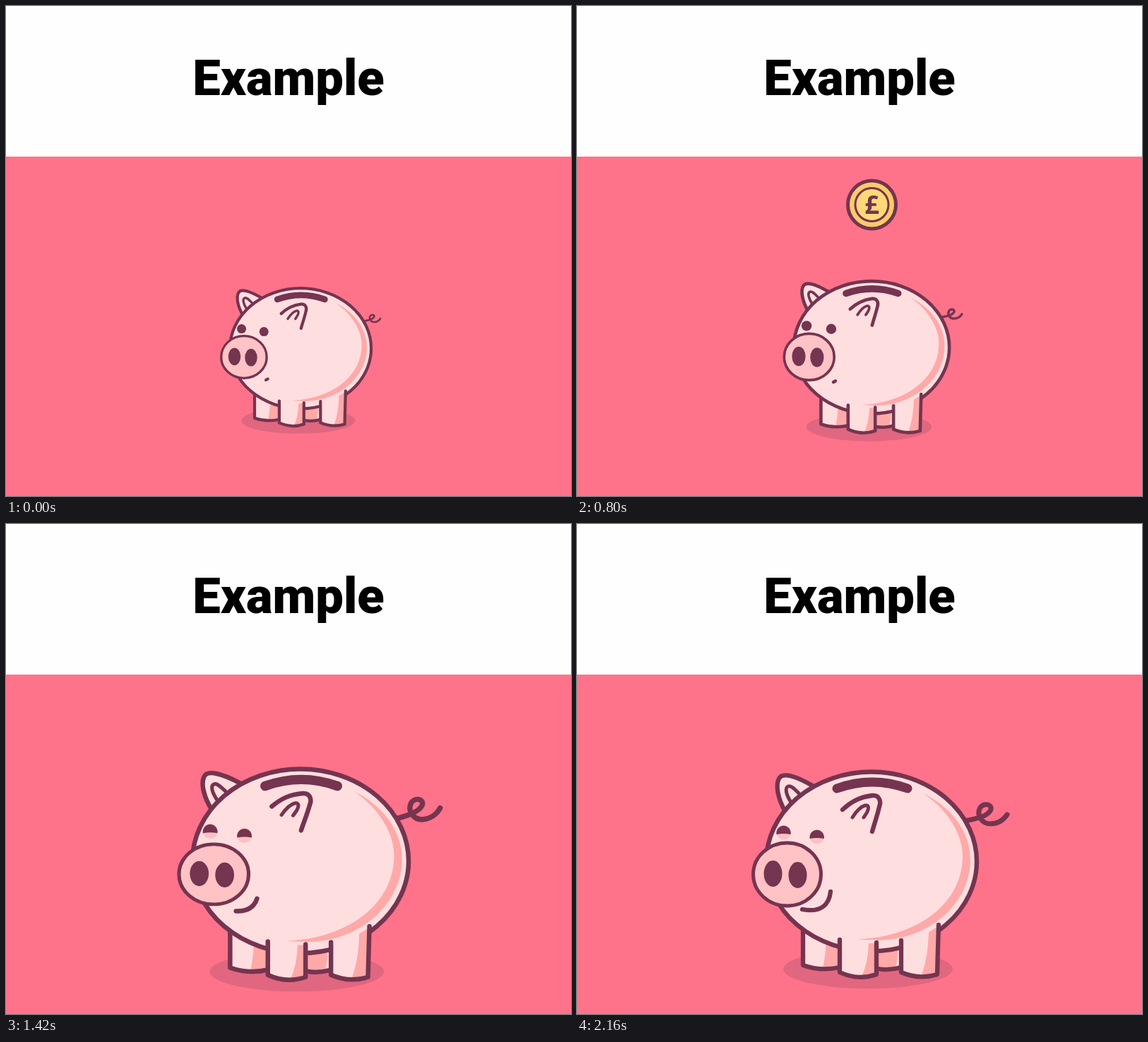
Animation of 800x693 px, one loop 2180 ms. Source, as an HTML page:

```html
<!DOCTYPE html>
<html lang="en">
<head>
<meta charset="utf-8">
<title>Piggy bank</title>
<style>
  html, body { margin: 0; width: 100%; height: 100%; overflow: hidden; background: #fefefe; }
  svg { display: block; width: 800px; height: 693px; }
  .line { stroke: #75344f; stroke-width: 6.3; stroke-linecap: round; stroke-linejoin: round; fill: none; }
  .thin { stroke-width: 5; }
  .skin { fill: #ffdee0; }
  .shade { fill: #ffa9a9; }
  .dark { fill: #75344f; }
  .lid { fill: #ffbfc5; }
</style>
</head>
<body>
<svg viewBox="0 0 800 693">
  <defs>
    <clipPath id="air"><rect id="airBox" y="213" width="800" height="480"/></clipPath>
    <g id="openEye"><circle class="dark" r="9.7"/></g>
    <g id="happyEye">
      <circle class="lid" r="10.3"/>
      <path class="dark" d="M-10 3A10.2 10.2 0 1 1 10 3Q0 1 -10 3Z"/>
    </g>
  </defs>
  <rect y="213" width="800" height="480" fill="#ff738a"/>

  <g id="pig">
    <ellipse cx="412" cy="629.5" rx="120" ry="27.5" fill="#e0677f"/>

    <!-- far legs -->
    <path class="skin" d="M320 560V624Q345 633 372 627V560Z"/>
    <path class="shade" d="M353 580Q353 606 348 629L372 627V580Z"/>
    <path class="line" d="M320 568V624Q345 633 372 627"/>
    <path class="skin" d="M425 595H460V628Q442 632 425 629Z"/>
    <path class="shade" d="M427 600H454Q455 618 450 629L427 629Z"/>
    <path class="line" d="M426 629Q442 632 459 627"/>

    <!-- tail -->
    <g id="tail">
      <path class="line" style="stroke-width:7" d="M548 420C568 417 583 412 586 404C588 396 576 394 571 401C565 411 573 424 585 424C597 424 605 417 609 411"/>
    </g>

    <!-- back ear -->
    <g id="backEar">
      <path class="line" style="fill:#ffdee0" d="M295 407C284 388 281 369 286 360C291 350 311 357 335 371"/>
      <path class="line thin" d="M302 392C296 382 294 373 299 371C304 369 310 377 316 383"/>
    </g>

    <!-- body -->
    <ellipse class="line" style="fill:#ffdee0" cx="417" cy="477.3" rx="149" ry="126.8"/>
    <path class="shade" d="M490 381C530 400 557 435 557 475C557 540 490 600 398 587C470 585 545 545 546 470C546 435 520 400 490 381Z"/>
    <path class="line" style="stroke-width:13" d="M368 374Q418 356 468 374"/>
    <g id="frontEar">
      <path class="line" d="M376 404C388 393 400 386 418 384C428 383 431 392 428 400C425 413 421 424 418 435"/>
      <path class="line thin" d="M390 415C395 407 401 400 408 398C414 397 413 403 411 407C409 411 407 413 406 415"/>
    </g>

    <!-- near legs -->
    <path class="skin" d="M372 588V634Q398 646 424 637V588Z"/>
    <path class="shade" d="M413 593Q412 622 403 640L424 637V593Z"/>
    <path class="line" d="M372 588V634Q398 646 424 637V592"/>
    <path class="skin" d="M459 589V634Q485 645 510 637L512 567Z"/>
    <path class="shade" d="M498 577Q497 615 487 640L510 637L512 569Z"/>
    <path class="line" d="M459 589V634Q485 645 510 637L512 567"/>

    <!-- face -->
    <g id="eyeL"><use href="#openEye"/><use href="#happyEye"/></g>
    <g id="eyeR"><use href="#openEye"/><use href="#happyEye"/></g>
    <path id="mouth" class="line" pathLength="100" d="M319 545C345 550 357 539 359 520"/>
    <g id="snout">
      <ellipse class="line thin" style="fill:#ffc3c6" cx="297.5" cy="495.5" rx="48" ry="44.5"/>
      <ellipse class="dark" cx="277.5" cy="494.5" rx="13" ry="18.5"/>
      <ellipse class="dark" cx="312.5" cy="496.5" rx="13" ry="18.5"/>
    </g>
  </g>

  <g clip-path="url(#air)">
    <g id="coin">
      <circle class="line thin" style="fill:#f9cb6b" r="34"/>
      <circle class="line" style="fill:#ffd978;stroke-width:3" r="23.5"/>
      <text class="dark" y="13" text-anchor="middle" font-family="Open Sans, sans-serif" font-weight="700" font-size="36">£</text>
    </g>
  </g>

  <text x="400" y="126" text-anchor="middle" font-family="Roboto, sans-serif" font-weight="800" font-size="70.5">Example</text>
</svg>
<script>
const LOOP = 2180, CX = 417.3, CY = 498.5, SMALL = 0.671;
const $ = id => document.getElementById(id);
const move = (id, value) => $(id).setAttribute('transform', value);
const linear = u => u;
const sine = u => (1 - Math.cos(Math.PI * u)) / 2;

// Value at time t from [time, value] keys.
function track(t, keys, ease = linear) {
  if (t <= keys[0][0]) return keys[0][1];
  for (let i = 1; i < keys.length; i++) {
    const [t0, a] = keys[i - 1], [t1, b] = keys[i];
    if (t <= t1) return a + (b - a) * ease((t - t0) / (t1 - t0));
  }
  return keys[keys.length - 1][1];
}

const growth = [[100, SMALL], [240, .674], [380, .683], [620, .716], [800, .739], [1000, .761], [1170, .774],
  [1260, .913], [1340, 1], [1400, 1.03], [1480, 1.02], [1560, 1.003], [1660, 1]];
const fall = [[220, 172], [380, 227], [520, 269], [640, 281], [1040, 281], [1110, 266], [1160, 246], [1180, 252], [1240, 430]];
const wiggle = [[1300, 0], [1600, 1], [1680, 1], [1980, 0]];
const blink = [[1190, 1], [1250, .25], [1270, .25], [1350, 1]];
const smile = [[1280, 0], [1520, 1]];

function eye(id, x, y, open, happy) {
  move(id, `translate(${x} ${y}) scale(1 ${open})`);
  const [plain, glad] = $(id).children;
  plain.style.display = happy ? 'none' : '';
  glad.style.display = happy ? '' : 'none';
}

function draw(t) {
  const k = track(t, growth), w = track(t, wiggle, sine);
  const tail = .56 + .44 * (k - SMALL) / (1 - SMALL);
  move('pig', `translate(${CX} ${CY}) scale(${k}) translate(${-CX} ${-CY})`);
  move('tail', `rotate(${-15 * w} 540 424) translate(555 419) scale(${tail}) translate(-555 -419)`);
  move('backEar', `rotate(${-8 * w} 310 400)`);
  move('frontEar', `rotate(${8 * w} 417 432)`);
  move('snout', `translate(0 495.5) scale(1 ${1 - .2 * w}) translate(0 -495.5)`);

  const open = track(t, blink), happy = t > 1265;
  eye('eyeL', 292.5, 436, open, happy);
  eye('eyeR', 339.7, 442, open, happy);

  // The mouth is a trimmed arc that grows from its middle.
  const len = 8 + 92 * track(t, smile, sine);
  $('mouth').setAttribute('stroke-dasharray', `${len} 200`);
  $('mouth').setAttribute('stroke-dashoffset', (len - 100) / 2);

  const slot = CY + (364 - CY) * k;
  $('airBox').setAttribute('height', slot - 213);
  move('coin', `translate(417.5 ${track(t, fall)})`);
}

const start = performance.now();
function tick() {
  draw((performance.now() - start) % LOOP);
  requestAnimationFrame(tick);
}
draw(0);
tick();
</script>
</body>
</html>
```
